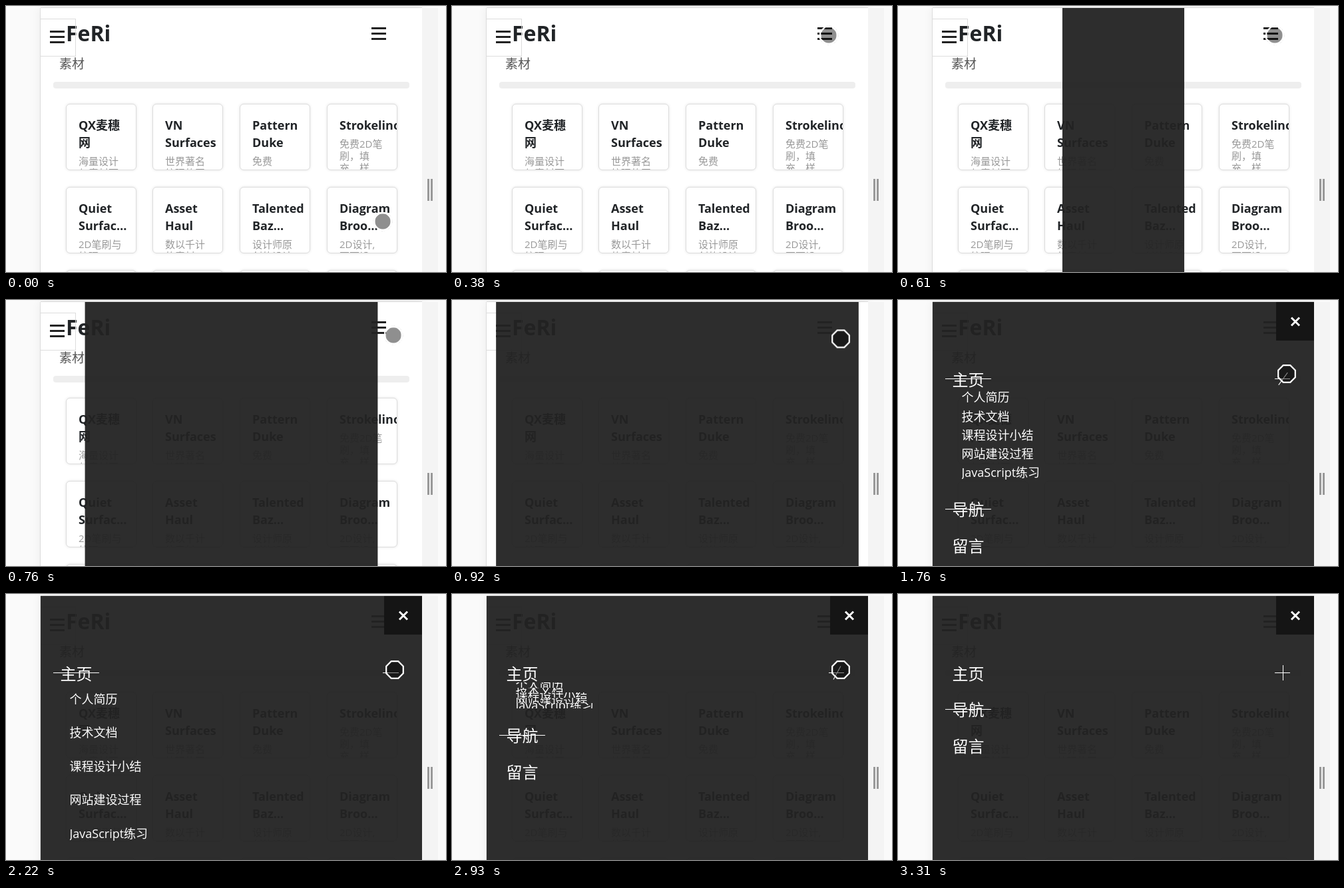
An HTML page for the animation above (3620 ms loop, 661 by 400 pixels).

```html
<!DOCTYPE html>
<html lang="zh-CN">
<head>
<meta charset="utf-8">
<title>Menu demo</title>
<style>
* { box-sizing: border-box; }
html, body { margin: 0; width: 100%; height: 100%; overflow: hidden; }
body { position: relative; background: #fafafa; color: #212427; font-family: "Open Sans", "Noto Sans CJK SC", "Noto Sans CJK", sans-serif; }
.stage { position: absolute; left: 0; top: 0; width: 661px; height: 400px; overflow: hidden; }
.stage * { position: absolute; white-space: nowrap; }
.gutter { left: 625px; top: 3px; width: 24px; height: 397px; background: #f4f4f4; }
.grip { left: 633px; top: 260px; width: 8px; height: 33px; border: solid #999; border-width: 0 3px; }
.page { left: 52px; top: 3px; width: 573px; height: 420px; background: #fff; box-shadow: 0 0 14px rgba(0,0,0,.07), 0 -1px 0 #dcdcdc, -1px 0 0 #e4e4e4; }
.brand { left: 90px; top: 21px; font: bold 32px/40px "Open Sans", sans-serif; }
.tag { left: 80px; top: 73px; font-size: 19px; line-height: 28px; color: #555; }
.bar { left: 71px; top: 114px; width: 535px; height: 10px; border-radius: 4px; background: #eee; }
.tab { left: 51px; top: 19px; width: 54px; height: 57px; border: 1px solid #ddd; border-left: 0; }
.burger { width: 22px; height: 19px; background: repeating-linear-gradient(#222 0 3px, transparent 3px 8px); }
.card { width: 106px; height: 100px; border: 1px solid #dcdcdc; border-radius: 6px; overflow: hidden; background: #fff; box-shadow: 0 0 4px rgba(0,0,0,.1); }
.card * { position: static; }
.card div { padding: 18px 0 0 18px; }
.card b { display: block; font-size: 18px; line-height: 26px; }
.card p { margin: 6px 0 0; font-size: 15px; line-height: 18px; color: #999; }
.veil { left: 52px; top: 3px; width: 573px; height: 397px; background: rgba(34,34,34,.95); }
.close { left: 568px; top: 3px; width: 57px; height: 58px; background: #151515; }
.menu { left: 0; top: 0; width: 661px; height: 400px; color: #fff; }
.nav { left: 81.5px; top: 105.5px; }
.nav * { position: relative; }
.item { height: 27.3px; margin-bottom: 27.7px; font-size: 24px; line-height: 27.3px; }
.item.open { height: auto; }
.sub { margin: 0; padding: 0 0 0 14px; list-style: none; font-size: 18px; font-weight: 500; }
.sub li { display: flex; align-items: center; overflow: hidden; line-height: 27px; }
.nav i { position: absolute; left: -10.5px; top: 12.5px; width: 69px; height: 1px; background: #fff; }
svg { overflow: visible; left: 0; top: 0; width: 1px; height: 1px; }
</style>
</head>
<body>
<div class="stage">
  <div class="page"></div>
  <div class="gutter"></div>
  <div class="grip"></div>
  <div class="brand">FeRi</div>
  <div class="tag">素材</div>
  <div class="bar"></div>
  <div class="tab"></div>
  <div class="burger" style="left:66px;top:37px"></div>
  <div class="burger" style="left:549px;top:32px"></div>
  <div id="cards"></div>
  <div class="veil" id="veil"></div>
  <div class="close" id="close"></div>
  <div class="menu" id="menu">
    <svg fill="none" stroke="#fff">
      <path d="M591 26.5l12 12m0-12l-12 12" stroke-width="3"/>
      <path d="M566 118.5h23"/>
      <path id="stem" d="M578.5 107v23" style="transform-origin:578.5px 118.5px"/>
    </svg>
    <div class="nav">
      <div class="item open"><i id="strike"></i>主页<ul class="sub" id="sub"></ul></div>
      <div class="item"><i></i>导航</div>
      <div class="item">留言</div>
    </div>
  </div>
  <svg id="cursor">
    <circle r="14" fill="none" stroke="rgba(0,0,0,.22)" stroke-dasharray="9 2"/>
    <circle r="11.7" fill="rgba(0,0,0,.44)"/>
    <path d="M-5.3-12.8H5.3L12.8-5.3V5.3L5.3 12.8H-5.3L-12.8 5.3V-5.3Z" fill="none" stroke="#fff" stroke-width="2.2"/>
  </svg>
</div>
<script>
const LOOP = 3620, TICK = 1000 / 13, LEAD = 10;
const QUINT = 'cubic-bezier(.23,1,.32,1)', CUBIC = 'cubic-bezier(.215,.61,.355,1)';
const $ = id => document.getElementById(id);

// title lines, description lines
const cards = [
  ['QX麦穗/网', '海量设计/与素材下'], ['VN/Surfaces', '世界著名/纹理的网'],
  ['Pattern/Duke', '免费'], ['Strokelino', '免费2D笔/刷，填/充，样'],
  ['Quiet/Surfac…', '2D笔刷与/纹理'], ['Asset/Haul', '数以千计/的素材'],
  ['Talented/Baz…', '设计师原/创的设计'], ['Diagram/Broo…', '2D设计,/页面设'],
  ['', ''], ['', ''], ['', ''], ['', '']
];
const lines = s => s.replaceAll('/', '<br>');
$('cards').innerHTML = cards.map(([title, text], n) => {
  const x = Math.floor(90 + n % 4 * 130.7), y = 147 + Math.floor(n / 4) * 125;
  return `<div class="card" style="left:${x}px;top:${y}px"><div><b>${lines(title)}</b><p>${lines(text)}</p></div></div>`;
}).join('');
$('sub').innerHTML = ['个人简历', '技术文档', '课程设计小结', '网站建设过程', 'JavaScript练习']
  .map(s => `<li>${s}</li>`).join('');

const anims = [];
// steps: [ms, style, easing towards the next step]
function track(el, steps) {
  const frames = steps.map(([ms, style, easing = 'linear']) => ({ offset: ms / LOOP, easing, ...style }));
  frames.push({ ...frames.at(-1), offset: 1 });
  const a = el.animate(frames, { duration: LOOP, fill: 'both' });
  a.pause();
  anims.push(a);
}
// value goes from off to on at start, then back at end
function toggle(el, off, on, start, end, ms, easing) {
  track(el, [[0, off], [start, off, easing], [start + ms, on], [end, on, easing], [end + ms, off]]);
}

track($('veil'), [[0, { transform: 'scaleX(0)' }], [479, { transform: 'scaleX(0)' }, 'ease'], [1079, { transform: 'scaleX(1)' }]]);
track($('close'), [[0, { opacity: 0 }, 'step-end'], [980, { opacity: 1 }]]);
track($('menu'), [[0, { opacity: 0 }], [1030, { opacity: 0 }, 'ease'], [1530, { opacity: 1 }]]);
track($('strike'), [[0, { opacity: 0 }, 'step-end'], [1700, { opacity: 1 }, 'step-end'], [2780, { opacity: 0 }]]);
toggle($('stem'), { transform: 'rotate(0deg)' }, { transform: 'rotate(90deg)' }, 1684, 2762, 500, CUBIC);
for (const li of $('sub').children)
  toggle(li, { height: '0px' }, { height: '50.5px' }, 1684, 2762, 500, QUINT);

const path = [
  [0, 566, 324], [67, 571, 266], [144, 570, 178], [221, 563, 98], [298, 558, 56], [375, 566, 44],
  [605, 566, 44], [759, 582, 53], [1220, 588, 69], [1528, 584, 109], [1605, 584, 111],
  [1759, 584, 111], [2220, 584, 114], [3060, 584, 114], [3220, 604, 116]
];
track($('cursor'), path.map(([ms, x, y]) => [ms, { transform: `translate(${x}px,${y}px)` }]));
track($('cursor'), [[0, { opacity: 1 }, 'step-end'], [3260, { opacity: 0 }]]);

function draw() {
  const t = performance.now() % LOOP;
  const held = Math.max(0, Math.floor((t + LEAD) / TICK) * TICK - LEAD);
  for (const a of anims) a.currentTime = held;
  requestAnimationFrame(draw);
}
draw();
</script>
</body>
</html>
```
